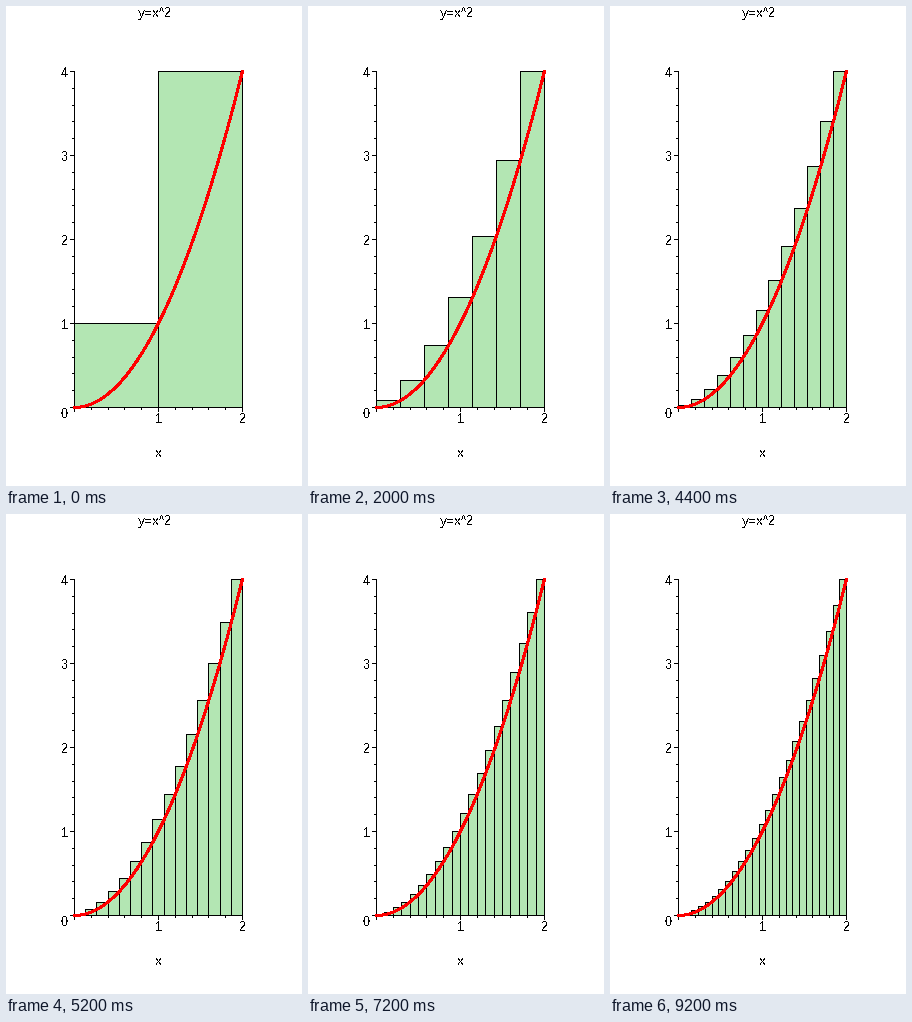
Animation, 296 px wide and 480 px high, one loop 9600 ms. Source, as a matplotlib script:

```python
import numpy as np
import matplotlib.pyplot as plt
from matplotlib.animation import FuncAnimation
from matplotlib.patches import PathPatch
from matplotlib.path import Path

plt.rcParams.update({
    "font.family": "Liberation Sans",
    "text.hinting": "native",
    "text.hinting_factor": 1,
    "text.antialiased": False,
    "lines.antialiased": False,
    "patch.antialiased": False,
    "toolbar": "None",
})

W, H, DPI = 296, 480, 100
PX = 72 / DPI                    # one pixel in points
LEFT, BASE, UNIT = 68, 401, 84   # plot origin and pixels per unit
FIRST, LAST = 2, 25              # number of bars
FILL = "#b3e6b3"

fig = plt.figure(figsize=(W / DPI, H / DPI), dpi=DPI, facecolor="white")
ax = fig.add_axes([0, 0, 1, 1])
ax.set_xlim(-0.5, W - 0.5)       # whole numbers are pixel centres
ax.set_ylim(H - 0.5, -0.5)
ax.axis("off")


def snap(v):
    return np.floor(v + 0.5 + 1e-9)


def px(x):
    return snap(LEFT + UNIT * x)


def py(y):
    return snap(BASE - UNIT * y)


def line(xs, ys, color="black", width=1, z=2):
    ax.plot(xs, ys, color=color, lw=width * PX, zorder=z, snap=False)


def label(x, baseline, s):
    ax.text(x, baseline - 0.5, s, size=13 * PX, ha="center", va="baseline")


def bar_path(n):
    edges = np.arange(n + 1) * 2 / n
    left, right = px(edges[:-1]), px(edges[1:])
    top, base = py(edges[1:] ** 2), np.full(n, BASE)
    corners = [(left, base), (left, top), (right, top), (right, base)]
    polys = np.array(corners).transpose(2, 0, 1)
    return Path.make_compound_path(
        *[Path(np.vstack([p, p[:1]]), closed=True) for p in polys])


# Axes with major ticks at every unit and minor ticks at every fifth
line([LEFT, LEFT], [py(4), BASE])
line([LEFT, px(2)], [BASE, BASE])
for i in range(21):
    size = 2 if i % 5 else 4
    y = py(i / 5)
    line([LEFT - size, LEFT], [y, y])
    if i <= 10:
        x = px(i / 5)
        line([x, x], [BASE, BASE + size])

label(148, 11, "y=x^2")
label(152, 451, "x")
label(58, 412, "0")
for v in range(1, 5):
    label(58, py(v) + 6, str(v))
for v in (1, 2):
    label(px(v), 417, str(v))

t = np.linspace(0, 2, 60)
line(LEFT + UNIT * t - 0.1, BASE - UNIT * t ** 2 - 0.1, "#ff0000", 2, z=3)

bars = PathPatch(bar_path(FIRST), fc=FILL, ec="black", lw=PX,
                 zorder=1, snap=False)
ax.add_patch(bars)


def draw(i):
    bars.set_path(bar_path(FIRST + i))
    return (bars,)


anim = FuncAnimation(fig, draw, frames=LAST - FIRST + 1, interval=400,
                     repeat=True, repeat_delay=0, blit=False)
plt.show()
```
